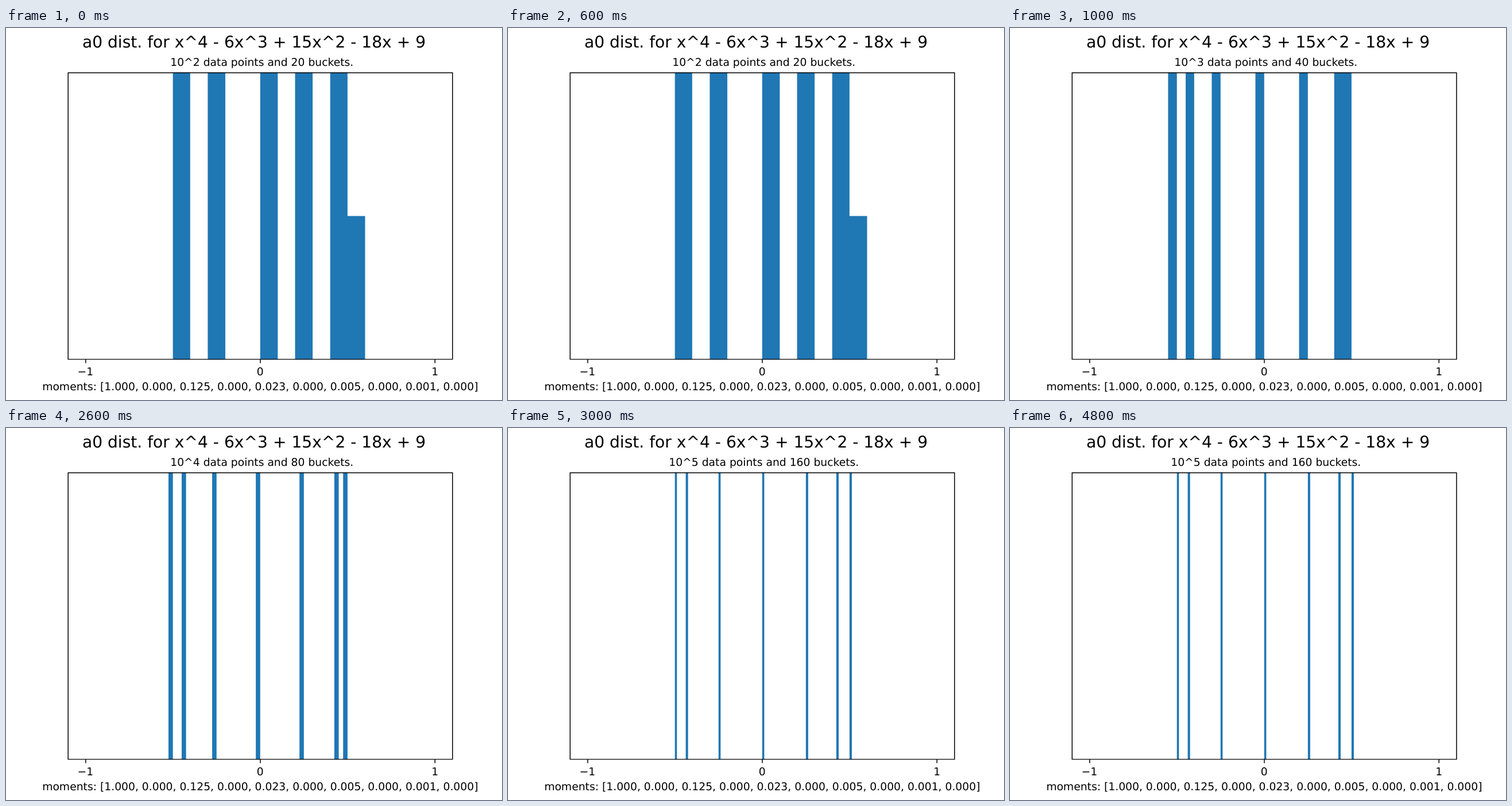
These frames come from a looping animation (864 by 648 pixels, 6 s). An HTML page:

```html
<!DOCTYPE html>
<html lang="en">
<head>
<meta charset="utf-8">
<title>a0 distribution</title>
<style>
  html, body { margin: 0; width: 100%; height: 100%; overflow: hidden; background: #fff; }
  svg { display: block; width: 864px; height: 648px; }
  text { font: 41.667px "DejaVu Sans", sans-serif; text-anchor: middle; text-rendering: geometricPrecision; }
  .title { font-size: 62.5px; }
  .axes { fill: none; stroke: #000; stroke-width: 3.333; }
  .step { fill: #1f77b4; visibility: hidden; animation: brief 6s step-end infinite; }
  .step text { fill: #000; }
  .step:last-child { animation-name: hold; }
  @keyframes brief { 0% { visibility: visible; } 16.6666%, 100% { visibility: hidden; } }
  @keyframes hold { 0% { visibility: visible; } 50%, 100% { visibility: hidden; } }
</style>
</head>
<body>
<svg viewBox="0 0 1920 1440">
  <text class="title" x="960" y="76.5">a0 dist. for x^4 - 6x^3 + 15x^2 - 18x + 9</text>
  <g id="steps"></g>
  <path class="axes" d="M240.5 173.5H1728.5V1282.5H240.5ZM308.5 1282v15M984.5 1282v15M1660.5 1282v15"/>
  <text x="307.6" y="1345">−1</text>
  <text x="984" y="1345">0</text>
  <text x="1660.4" y="1345">1</text>
  <text x="984" y="1403">moments: [1.000, 0.000, 0.125, 0.000, 0.023, 0.000, 0.005, 0.000, 0.001, 0.000]</text>
</svg>
<script>
  const TOP = 173, BASE = 1282, ANGLES = 12;

  const px = v => Math.round(984 + v * 1488 / 2.2);

  // Histogram of cos(t)/2 over evenly spaced angles. Values on a bucket
  // edge fall to the side given by the sign of nudge.
  function histogram(buckets, nudge) {
    const counts = new Map();
    for (let k = 0; k < ANGLES; k++) {
      const v = Math.cos(2 * Math.PI * k / ANGLES) / 2;
      const i = Math.floor(v * buckets / 2 + nudge);
      counts.set(i, (counts.get(i) || 0) + 1);
    }
    return [...counts];
  }

  function step(n) {
    const buckets = 20 * 2 ** n;
    const nudge = n % 3 ? -1e-6 : 1e-6;
    const limit = n ? 1 : 2;          // count that reaches the top of the plot
    const bars = histogram(buckets, nudge).map(([i, count]) => {
      const a = px(i * 2 / buckets), b = px((i + 1) * 2 / buckets);
      const y = Math.round(BASE - (BASE - TOP) * Math.min(1, count / limit));
      return `M${a} ${y}H${b}V${BASE}H${a}Z`;
    });
    return `<g class="step" style="animation-delay:${n ? n - 6 : 0}s"><path d="${bars.join("")}"/>` +
      `<text x="990.6" y="147">10^${n + 2} data points and ${buckets} buckets.</text></g>`;
  }

  document.getElementById("steps").innerHTML = [0, 1, 2, 3].map(step).join("");
</script>
</body>
</html>
```
